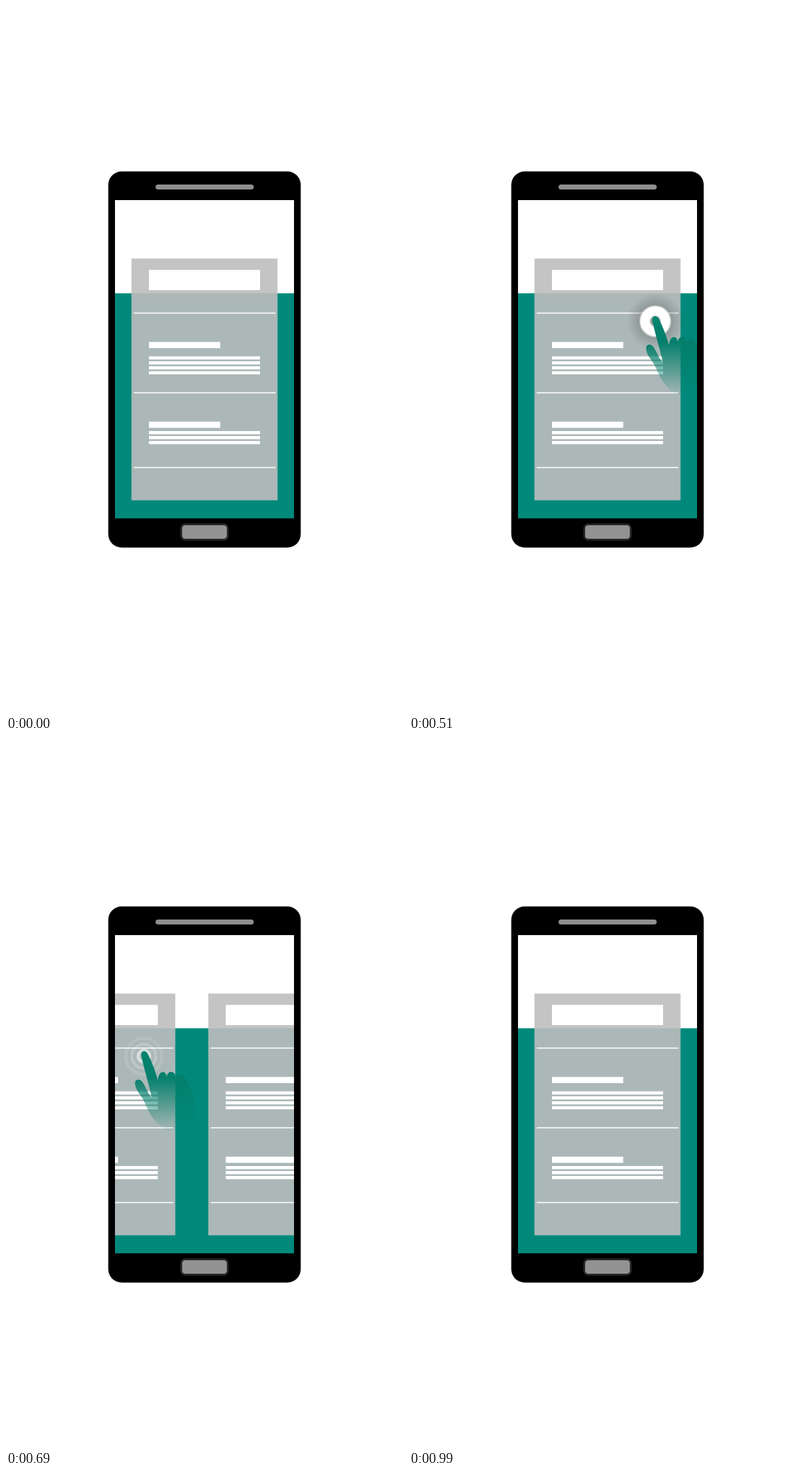
Recreate the animation shown at these times as an HTML page. Size 561 by 998 pixels, loop 1470 ms.

```html
<!DOCTYPE html>
<html lang="en">
<head>
<meta charset="utf-8">
<title>Swipe between cards</title>
<style>
html, body { margin: 0; width: 100%; height: 100%; overflow: hidden; background: #fff; }
svg { display: block; width: 100%; height: 100%; }
</style>
</head>
<body>
<svg viewBox="0 0 561 998">
  <defs>
    <clipPath id="screen"><rect x="154" y="274" width="253" height="449.5"/></clipPath>
    <linearGradient id="skin" gradientUnits="userSpaceOnUse" x1="0" y1="438" x2="0" y2="552">
      <stop offset="0" stop-color="#04846f"/>
      <stop offset=".32" stop-color="#047f6c"/>
      <stop offset="1" stop-color="#047f6c" stop-opacity="0"/>
    </linearGradient>
    <radialGradient id="shade">
      <stop offset=".5" stop-color="#555" stop-opacity=".35"/>
      <stop offset="1" stop-color="#555" stop-opacity="0"/>
    </radialGradient>
    <g id="card">
      <path fill="#bebebe" fill-opacity=".9" d="M177.3 356.5h206.4v341.3h-206.4z"/>
      <path fill="#fff" d="M202 372.5h157v28.5h-157z
        M202 474.3h100.7v8.6h-100.7z M202 586.8h100.7v8.6h-100.7z"/>
      <path stroke="#fff" stroke-width="1.7" d="M180.5 433.5h200.3M180.5 546h200.3M180.5 651.5h200.3"/>
      <path stroke="#fff" stroke-width="4.4" d="M202 496.8h157m-157 7h157m-157 7h157m-157 7h157
        M202 602.2h157m-157 7h157m-157 7h157"/>
    </g>
  </defs>

  <rect x="144.5" y="233.5" width="272" height="531" rx="19"/>
  <rect x="211.3" y="252" width="138.7" height="7" rx="3.5" fill="#8f8f8f"/>
  <rect x="247.6" y="731.6" width="65.8" height="21.8" rx="5.5" fill="#929292" stroke="#262626" stroke-width="2.6"/>

  <g clip-path="url(#screen)">
    <path fill="#fff" d="M154 274h253v132h-253z"/>
    <path fill="#00897b" d="M154 405.5h253v318h-253z"/>
    <g id="cards">
      <use href="#card"/>
      <use href="#card" x="253"/>
    </g>
    <g id="touch">
      <g id="press">
        <circle cx="348" cy="445" r="40" fill="url(#shade)"/>
        <g fill="none" stroke="#fff">
          <circle cx="348" cy="445" r="14.5" stroke-width="16" opacity=".5"/>
          <circle cx="348" cy="445" r="14.5" stroke-width="13"/>
        </g>
      </g>
      <g id="rings" fill="none" stroke="#fff">
        <circle cx="347.5" cy="445" r="8" stroke-width="5" opacity=".75"/>
        <circle cx="347.5" cy="445" r="17" stroke-width="4" opacity=".3"/>
        <circle cx="347.5" cy="445" r="25.5" stroke-width="4" opacity=".17"/>
      </g>
      <path id="hand" fill="url(#skin)" d="M344 445 C342 437 350 435.500 353 441.500
        C359 453 364 467 367.500 479 C368 464 379 464.500 379.800 474
        C381 464.500 391 464.500 392.500 474 C395 469 402 468.500 407 477
        C416 490 420.500 508 420 532 L418 556 C398 558 377 550 367 540
        C353 526 351 512 344 502 C339 495 336 491 335 484 C334.500 477 342 476 346 482
        C350 488 354 499 358.500 503 C355 485 347 460 344 445z"/>
    </g>
  </g>
</svg>
<script>
const el = id => document.getElementById(id);
const ramp = (t, from, to) => Math.min(1, Math.max(0, (t - from) / (to - from)));
const shift = (id, x) => el(id).setAttribute('transform', `translate(${x} 0)`);
const fade = (id, a) => el(id).setAttribute('opacity', a);

const LOOP = 1470, STEP = 30;

function draw(t) {
  const swipe = 1 - Math.pow(1 - ramp(t, 510, 990), 1.8);
  shift('cards', -253 * swipe);
  shift('touch', -267.5 * swipe);
  fade('hand', ramp(t, 240, 450));

  // The pressed disc dissolves into ripples once the drag begins.
  const grow = ramp(t, 390, 510), split = ramp(t, 510, 630);
  fade('press', grow * (1 - split));
  el('press').setAttribute('transform',
    `translate(348 445) scale(${0.4 + 0.6 * grow}) translate(-348 -445)`);
  fade('rings', split * (1 - 0.6 * ramp(t, 630, 750)) * (1 - ramp(t, 750, 870)));
}

const start = performance.now();
function tick() {
  const t = (performance.now() - start) % LOOP;
  draw(Math.floor(t / STEP) * STEP);
  requestAnimationFrame(tick);
}
tick();
</script>
</body>
</html>
```
